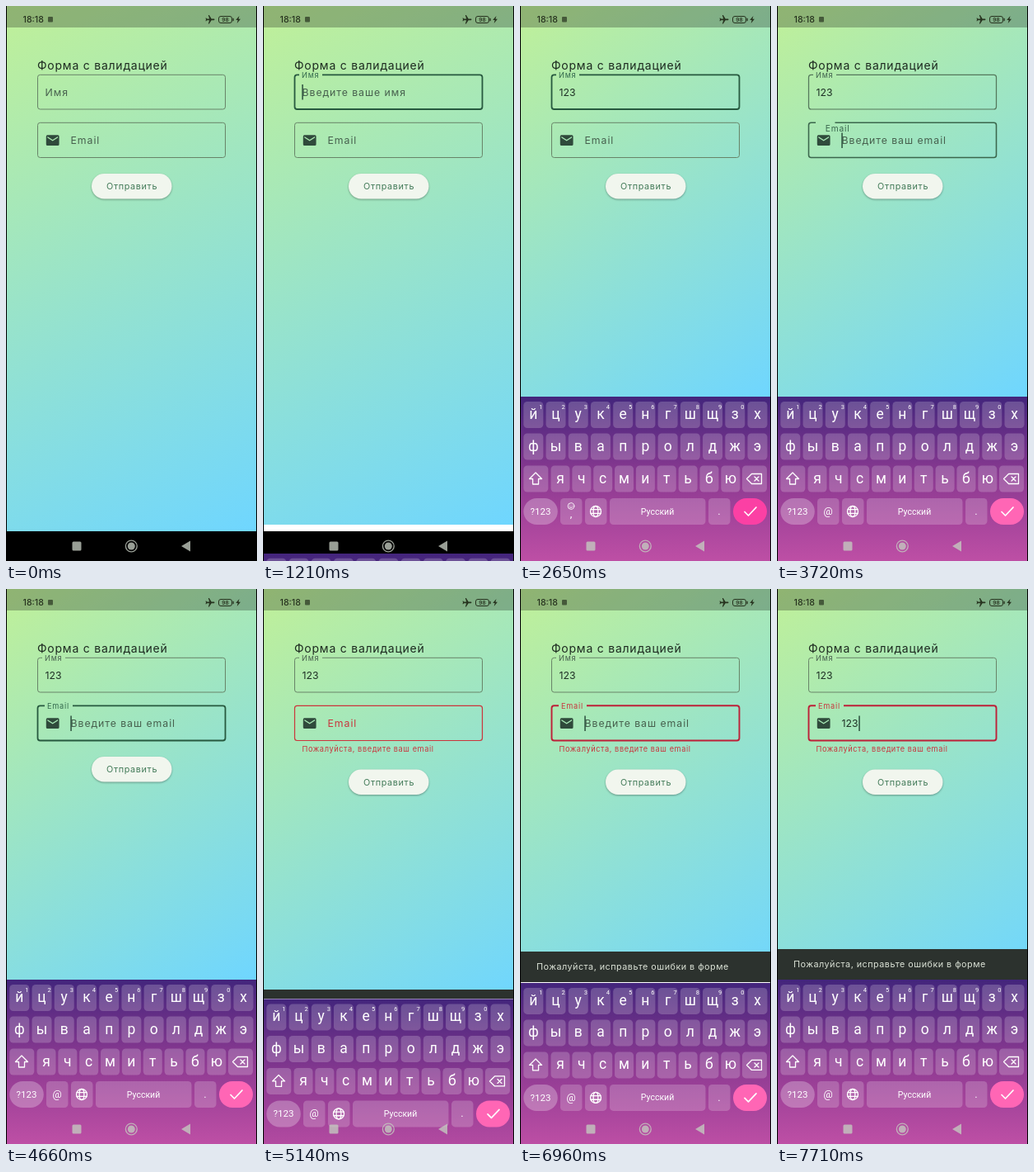
Recreate the animation shown at these times as an HTML page. Size 305 by 672 pixels, loop 8000 ms.

```html
<!DOCTYPE html>
<html lang="ru">
<head>
<meta charset="utf-8">
<title>Форма с валидацией</title>
<style>
@property --kb { syntax: "<length>"; inherits: true; initial-value: 672px; }
@property --body { syntax: "<length>"; inherits: true; initial-value: 636px; }
@property --name { syntax: "<length>"; inherits: true; initial-value: 0px; }
@property --mail { syntax: "<length>"; inherits: true; initial-value: 0px; }

html, body { margin: 0; width: 100%; height: 100%; overflow: hidden; background: #000; }
.stage {
  position: relative; width: 305px; height: 672px; overflow: hidden; background: #000;
  animation: keyboard 8s cubic-bezier(.4, 0, .2, 1) infinite, typing 8s step-end infinite;
}
svg { position: absolute; left: 0; top: 0; }
svg, .snack { font-family: Inter, "Noto Sans", sans-serif; }
.paper { position: absolute; left: 1px; top: 0; width: 303px; height: 636px; background: #fff; }
.app {
  position: absolute; left: 0; top: 0; width: 303px; overflow: hidden;
  height: min(636px, var(--body));
  background: linear-gradient(calc(180deg - atan2(303px, min(636px, var(--body)))), #c0f098, #6fd6ff);
}
.snack {
  position: absolute; left: 0; bottom: 0; width: 100%; height: 0; overflow: hidden;
  background: #2c322e; color: #dbe2d6; white-space: nowrap;
}
.snack span { position: absolute; left: 19px; top: 11px; font-size: 10.8px; line-height: 15px; letter-spacing: .48px; }

.anim, .snack, .snack span { animation: 8s cubic-bezier(.4, 0, .2, 1) infinite; }
.snack { animation-name: snack; }
.snack span { animation-name: snackText; }
.step { animation: 8s step-end infinite; }

.input { font-size: 12.3px; letter-spacing: .95px; fill: #47604e; }
.value { font-size: 12.3px; fill: #203327; }
.box { fill: none; stroke-dasharray: 0px 0px 600px; }
.box1 { animation-name: box1; }
.box2 { animation-name: box2; }
.label1 { animation-name: label1; }
.label2 { animation-name: label2; }
.hint { opacity: 0; }
.hint1 { animation-name: hint1; }
.hint2 { animation-name: hint2; }
.caret { opacity: 0; fill: #2b4f3d; }
.caret1 { animation-name: caret1; }
.caret2 { animation-name: caret2; }
.at1 { transform: translateX(var(--name)); }
.at2 { transform: translateX(var(--mail)); }
.clip1 { width: var(--name); }
.clip2 { width: var(--mail); }
.error { font-size: 9.2px; letter-spacing: .6px; fill: #c8363e; opacity: 0; animation-name: error; }
.button { filter: drop-shadow(0 1px 1px #0005); animation-name: push; }
.keys { transform: translateY(calc(var(--kb) - 473px)); font-family: Roboto, "Noto Sans", sans-serif; fill: #fff; text-anchor: middle; }
.line { fill: none; stroke: #fff; stroke-width: 1.3; stroke-linejoin: round; stroke-linecap: round; }
.comma { animation-name: comma; }
.sign { opacity: 0; animation-name: sign; }
.enter { fill: #fb40a4; animation-name: enter; }

@keyframes keyboard {
  0%, 14.65% { --kb: 672px; --body: 636px; }
  18.4%, 63.55% { --kb: 473px; --body: 473px; }
  67.3%, 83.92% { --kb: 672px; --body: 672px; }
  83.94% { --kb: 672px; --body: 636px; }
  87.69%, 100% { --kb: 473px; --body: 473px; }
}
@keyframes typing {
  0% { --name: 0px; --mail: 0px; }
  21.06% { --name: 5.9px; --mail: 0px; }
  23.75% { --name: 13.3px; --mail: 0px; }
  26.875% { --name: 21px; --mail: 0px; }
  93.75% { --name: 21px; --mail: 5.9px; }
  95% { --name: 21px; --mail: 13.3px; }
  96.25%, 100% { --name: 21px; --mail: 21px; }
}
@keyframes box1 {
  0%, 11.625% { stroke: #688468; stroke-width: 1px; stroke-dasharray: 0px 0px 600px; }
  13.75%, 45.59% { stroke: #27593f; stroke-width: 1.8px; stroke-dasharray: 0px 28px 600px; }
  47.68%, 100% { stroke: #688468; stroke-width: 1px; stroke-dasharray: 0px 28px 600px; }
}
@keyframes box2 {
  0%, 45.59% { stroke: #688468; stroke-width: 1px; stroke-dasharray: 0px 0px 600px; }
  47.68%, 62% { stroke: #27593f; stroke-width: 1.8px; stroke-dasharray: 0px 34px 600px; }
  64.09%, 80% { stroke: #cb343b; stroke-width: 1.2px; stroke-dasharray: 0px 0px 600px; }
  82.09%, 100% { stroke: #bd2038; stroke-width: 1.9px; stroke-dasharray: 0px 34px 600px; }
}
@keyframes label1 {
  0%, 11.625% { transform: translate(47.5px, 108.6px) scale(1); fill: #47604e; }
  13.75%, 45.59% { transform: translate(47px, 87px) scale(.75); fill: #33694d; }
  47.68%, 100% { transform: translate(47px, 87px) scale(.75); fill: #47604e; }
}
@keyframes label2 {
  0%, 45.59% { transform: translate(78.5px, 167.3px) scale(1); fill: #47604e; }
  47.68%, 62% { transform: translate(50px, 145.3px) scale(.75); fill: #33694d; }
  64.09%, 80% { transform: translate(78.5px, 167.3px) scale(1); fill: #c8363e; }
  82.09%, 100% { transform: translate(50px, 145.3px) scale(.75); fill: #c8363e; }
}
@keyframes hint1 {
  0%, 11.625% { opacity: 0; }
  13.75%, 21.05% { opacity: 1; }
  21.06%, 100% { opacity: 0; }
}
@keyframes hint2 {
  0%, 45.59% { opacity: 0; }
  46.5%, 62% { opacity: 1; }
  62.9%, 80.5% { opacity: 0; }
  82.09%, 93.74% { opacity: 1; }
  93.75%, 100% { opacity: 0; }
}
@keyframes caret1 {
  0%, 17.75%, 33.125%, 45.59% { opacity: 0; }
  11.625%, 21.06%, 39.75% { opacity: 1; }
}
@keyframes caret2 {
  0%, 50%, 62%, 87.5% { opacity: 0; }
  45.6%, 55.75%, 81%, 93.75% { opacity: 1; }
}
@keyframes error {
  0%, 62% { opacity: 0; }
  63.8%, 100% { opacity: 1; }
}
@keyframes push {
  0% { transform: none; }
  62%, 100% { transform: translateY(15.5px); }
}
@keyframes snack {
  0%, 63.39% { height: 0; }
  66.51%, 100% { height: 37px; }
}
@keyframes snackText {
  0%, 64.6% { opacity: 0; }
  66.51%, 100% { opacity: 1; }
}
@keyframes comma {
  0% { opacity: 1; }
  45.5%, 100% { opacity: 0; }
}
@keyframes sign {
  0% { opacity: 0; }
  45.5%, 100% { opacity: 1; }
}
@keyframes enter {
  0% { fill: #fb40a4; }
  45.5%, 100% { fill: #ff66b5; }
}
</style>
</head>
<body>
<div class="stage">
  <div class="paper">
    <div class="app">
      <div class="snack"><span>Пожалуйста, исправьте ошибки в форме</span></div>
    </div>
  </div>

  <svg width="305" height="672" viewBox="0 0 305 672">
    <defs>
      <clipPath id="nameClip"><rect class="clip1" x="47.5" y="92" height="24"/></clipPath>
      <clipPath id="mailClip"><rect class="clip2" x="78.5" y="150" height="24"/></clipPath>
      <linearGradient id="violet" x2="0" y2="1">
        <stop offset="0" stop-color="#43257c"/>
        <stop offset=".5" stop-color="#8d3a92"/>
        <stop offset="1" stop-color="#be4fa5"/>
      </linearGradient>
    </defs>

    <!-- status bar -->
    <rect x="1" width="303" height="26" opacity=".25"/>
    <g fill="#27331f">
      <text x="20.5" y="20.3" font-size="10.6" font-weight="500">18:18</text>
      <rect x="51" y="13" width="6" height="6.5" rx="1" opacity=".7"/>
      <path transform="translate(248 16.3) rotate(90) scale(.55) translate(-11.5 -12)" d="M21 16v-2l-8-5V3.5a1.5 1.5 0 0 0-3 0V9l-8 5v2l8-2.5V19l-2 1.5V22l3.500-1 3.500 1v-1.500L13 19v-5.500l8 2.500z"/>
      <rect x="258.5" y="12.500" width="16" height="8" rx="2.500" fill="none" stroke="#27331f"/>
      <rect x="275.500" y="14.800" width="1.300" height="3.400"/>
      <text x="266.500" y="19" font-size="6.500" font-weight="600" text-anchor="middle">98</text>
      <path d="M283.500 12l-4.300 5h2.500l-1 4 4.300-5.200h-2.500z"/>
    </g>

    <!-- form -->
    <text x="38" y="77" font-size="14" letter-spacing=".77" fill="#1d2a20">Форма с валидацией</text>

    <path class="box box1 anim" d="M44 83.300H263.500a3 3 0 0 1 3 3V122a3 3 0 0 1-3 3H41.500a3 3 0 0 1-3-3V86.300a3 3 0 0 1 3-3z"/>
    <g class="label1 anim"><text class="input" style="fill:inherit">Имя</text></g>
    <text class="input hint hint1 anim" x="47.500" y="108.600">Введите ваше имя</text>
    <text class="value" x="47.500" y="108.600" clip-path="url(#nameClip)">123</text>
    <g class="at1"><rect class="caret caret1 step" x="47.300" y="95" width="1.500" height="18.500"/></g>

    <path class="box box2 anim" d="M47 141.300H263.500a3 3 0 0 1 3 3V180.500a3 3 0 0 1-3 3H41.500a3 3 0 0 1-3-3V144.300a3 3 0 0 1 3-3z"/>
    <path fill="#2f4a3b" transform="translate(47.200 153.200) scale(.79)" d="M20 4H4a2 2 0 0 0-2 2v12a2 2 0 0 0 2 2h16a2 2 0 0 0 2-2V6a2 2 0 0 0-2-2zm0 4l-8 5-8-5V6l8 5 8-5z"/>
    <g class="label2 anim"><text class="input" style="fill:inherit">Email</text></g>
    <text class="input hint hint2 anim" x="78.500" y="167.300">Введите ваш email</text>
    <text class="value" x="78.500" y="167.300" clip-path="url(#mailClip)">123</text>
    <g class="at2"><rect class="caret caret2 step" x="78.300" y="153.500" width="1.500" height="18.500"/></g>

    <text class="error anim" x="47.500" y="196.500">Пожалуйста, введите ваш email</text>
    <g class="button step">
      <rect x="104" y="203" width="97.500" height="30.500" rx="15.250" fill="#f1f6ee"/>
      <text x="122" y="222" font-size="10.800" letter-spacing=".65" fill="#437b59">Отправить</text>
    </g>

    <!-- keyboard -->
    <g class="keys">
      <rect x="1" y="473" width="303" height="199" fill="url(#violet)"/>
      <g id="keys"></g>
      <path class="line" d="M19 565l-7.500 7.500h4v6.500h7v-6.500h4z"/>
      <path class="line" d="M281.500 566.500h12v12h-12l-6-6zM285 570l5 5M290 570l-5 5"/>
      <text x="25" y="616" font-size="11.500">?123</text>
      <g class="comma step">
        <circle class="line" cx="62" cy="605.500" r="3.800" stroke-width="1" style="stroke-width:.9"/>
        <path class="line" style="stroke-width:.9" d="M60 606.500q2 2 4 0M60.700 604.300v.1M63.300 604.300v.1"/>
        <text x="62" y="619" font-size="13">,</text>
      </g>
      <text class="sign step" x="62" y="616" font-size="12.500">@</text>
      <g class="line">
        <circle cx="92" cy="612" r="6.500"/>
        <ellipse cx="92" cy="612" rx="2.900" ry="6.500"/>
        <path d="M86 609.700h12M86 614.300h12"/>
      </g>
      <text x="167" y="615.500" font-size="10.500">Русский</text>
      <text x="242" y="616" font-size="13">.</text>
      <rect class="enter step" x="259" y="596" width="41" height="32" rx="16"/>
      <path class="line" style="stroke-width:1.700" d="M273 612.500l4.500 4.500 9.500-10"/>
    </g>

    <!-- navigation -->
    <g fill="#c5ccc0" opacity=".78">
      <rect x="80.500" y="648.500" width="11" height="11" rx="1.500"/>
      <circle cx="152.300" cy="654" r="6.900" fill="none" stroke="#c5ccc0" stroke-width="1.400"/>
      <circle cx="152.300" cy="654" r="4.500"/>
      <path d="M213 654l11-6.500v13z"/>
    </g>
  </svg>
</div>

<script>
const board = document.getElementById("keys");

function add(tag, attrs, text = "") {
  const el = document.createElementNS("http://www.w3.org/2000/svg", tag);
  for (const name in attrs) el.setAttribute(name, attrs[name]);
  el.textContent = text;
  board.append(el);
}

function key(x, y, width, rx = 4.5, alpha = 0.2) {
  add("rect", { x, y, width, height: 32, rx, "fill-opacity": alpha });
}

function row(letters, y, left, pitch, width, digits = "") {
  [...letters].forEach((letter, i) => {
    const x = left + i * pitch;
    key(x, y, width);
    add("text", { x: x + width / 2, y: y + 21, "font-size": 17.5 }, letter);
    if (digits[i]) add("text", { x: x + width - 3, y: y + 8.5, "font-size": 7.5 }, digits[i]);
  });
}

row("йцукенгшщзх", 479, 4.3, 27.22, 24, "1234567890");
row("фывапролджэ", 517.5, 4.3, 27.22, 24);
row("ячсмитьбю", 556.5, 37.5, 25.85, 23);
key(4.3, 556.5, 30);
key(270, 556.5, 30);
key(4.3, 596, 41.5, 16, 0.27);
key(49, 596, 26.5);
key(79, 596, 26.5);
key(109, 596, 116.5);
key(229, 596, 26.5);
</script>
</body>
</html>
```
